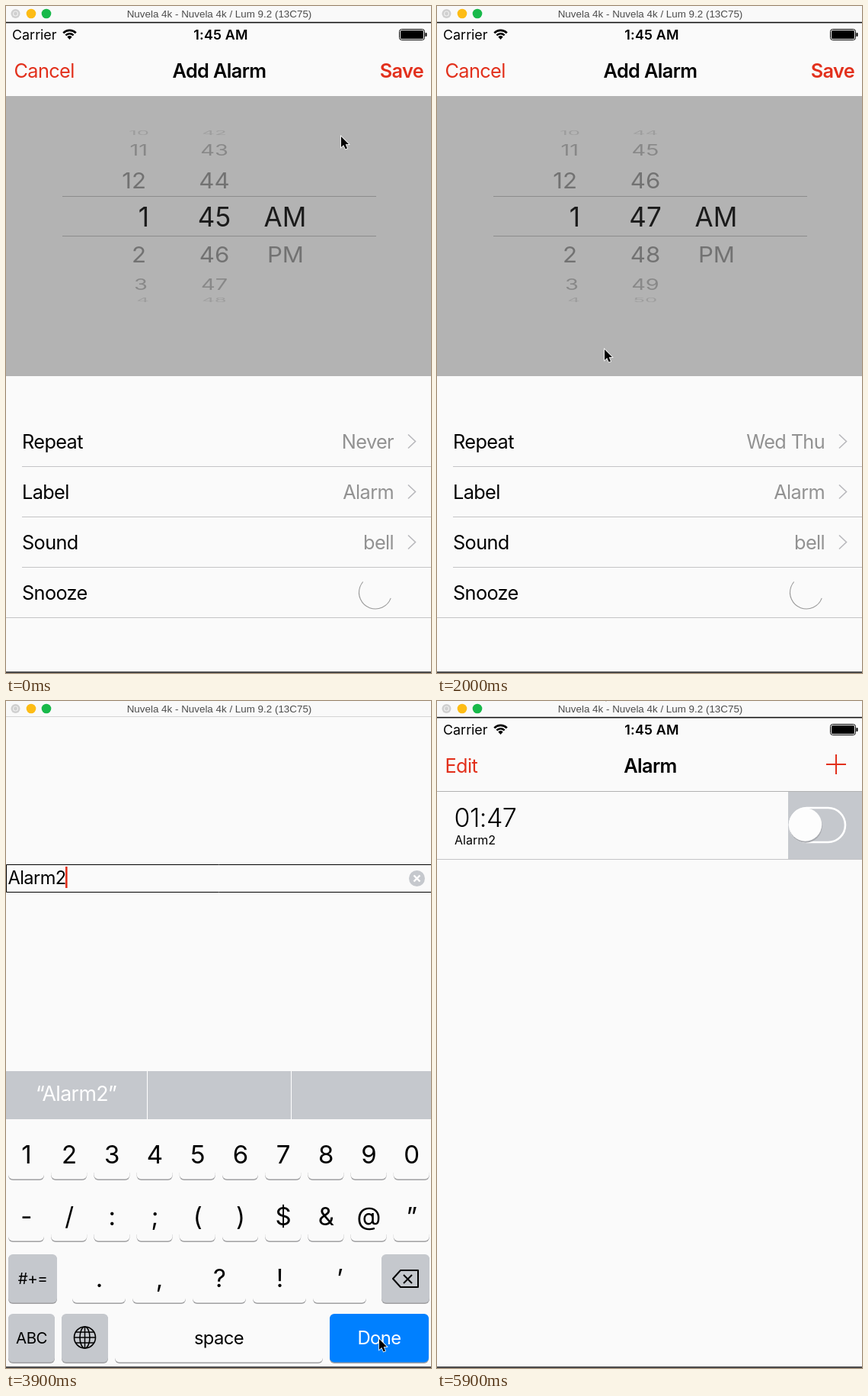
Write an HTML page with a canvas that moves like this. It is 558x874 px and loops after 6000 ms.

```html
<!DOCTYPE html>
<html lang="en">
<head>
<meta charset="utf-8">
<title>Alarm app</title>
<style>
  html, body { margin: 0; width: 100%; height: 100%; overflow: hidden; background: #fafafa; }
  canvas { display: block; }
</style>
</head>
<body>
<canvas id="stage" width="558" height="874"></canvas>
<script>
const ctx = document.getElementById('stage').getContext('2d');
const W = 558, H = 874, LOOP = 6000, STEP = 100;
const BG = '#fafafa', RED = '#e2301c', GREY = '#929292', KEY = '#c5c8cd', LINE = '#c4c4c6', PALE = '#e2e2e2';
const DAYS = ['Sunday', 'Monday', 'Tuesday', 'Wednesday', 'Thursday', 'Friday', 'Saturday'];

// Key times followed by values, joined by straight lines
const SCROLL = [[2600, 0], [2800, 150], [4500, 150], [4800, 0]];
const MINUTE = [[200, 45], [500, 47]];
const REPEAT = [[700, W], [800, 190], [900, 11], [1000, 0], [1700, 0], [1800, 400], [1900, W]];
const LABEL = [[2200, W], [2300, 300], [2400, 88], [2500, 0], [3900, 0], [4000, 400], [4100, W]];
const SHEET = [[5300, 0], [5400, 450], [5500, 1000]];
const POINTER = [
  [0, 440, 171], [200, 275, 320], [500, 275, 225], [700, 431, 572], [800, 431, 560], [900, 431, 402],
  [1000, 431, 345], [1200, 431, 345], [1300, 431, 410], [1400, 431, 410], [1700, 60, 65], [1800, 60, 70],
  [2100, 300, 640], [2200, 300, 636], [2400, 224, 497], [2800, 130, 700], [3000, 39, 825], [3100, 39, 825],
  [3400, 83, 598], [3500, 83, 598], [3800, 490, 836], [3900, 490, 836], [4300, 400, 640], [4500, 379, 594],
  [4800, 379, 594], [5200, 520, 85], [5300, 520, 85], [5900, 216, -16]
];

function track(keys, t, channel = 1) {
  const next = keys.findIndex(k => k[0] > t);
  if (next === 0) return keys[0][channel];
  if (next < 0) return keys[keys.length - 1][channel];
  const a = keys[next - 1], b = keys[next];
  return a[channel] + (b[channel] - a[channel]) * (t - a[0]) / (b[0] - a[0]);
}

function rect(x, y, w, h, color) {
  ctx.fillStyle = color;
  ctx.fillRect(x, y, w, h);
}

function round(x, y, w, h, r, color) {
  ctx.fillStyle = color;
  ctx.beginPath();
  ctx.roundRect(x, y, w, h, r);
  ctx.fill();
}

function outline(x, y, w, h, r, color, width) {
  ctx.strokeStyle = color;
  ctx.lineWidth = width;
  ctx.beginPath();
  ctx.roundRect(x, y, w, h, r);
  ctx.stroke();
}

function disc(x, y, r, color) {
  ctx.fillStyle = color;
  ctx.beginPath();
  ctx.arc(x, y, r, 0, 7);
  ctx.fill();
}

function stroke(color, width, ...points) {
  ctx.strokeStyle = color;
  ctx.lineWidth = width;
  ctx.beginPath();
  points.forEach(p => ctx.lineTo(...p));
  ctx.stroke();
}

function arc(x, y, r, from, to, color, width) {
  ctx.strokeStyle = color;
  ctx.lineWidth = width;
  ctx.beginPath();
  ctx.arc(x, y, r, from, to);
  ctx.stroke();
}

function text(str, x, y, { size = 25.3, color = '#000', align = 'left', weight = 400, gap = -.025 } = {}) {
  ctx.font = `${weight} ${size}px Inter, sans-serif`;
  ctx.letterSpacing = size * gap + 'px';
  ctx.textAlign = align;
  ctx.fillStyle = color;
  ctx.fillText(str, x, y);
}

function group(draw, dx = 0, dy = 0, alpha = 1) {
  ctx.save();
  ctx.translate(dx, dy);
  ctx.globalAlpha *= alpha;
  draw();
  ctx.restore();
}

const title = (str, x = 280) => text(str, x, 94, { weight: 600, align: 'center' });

function navBar() {
  rect(0, 22, W, 97, BG);
  rect(0, 118, W, 1, '#b2b2b2');
}

function statusBar() {
  rect(0, 21, W, 1.4, '#111');
  text('Carrier', 8, 44, { size: 17.9, gap: 0 });
  for (const r of [7.2, 11.6]) arc(83.5, 43.5, r, -2.36, -.78, '#000', 2.6);
  ctx.fillStyle = '#000';
  ctx.beginPath();
  ctx.moveTo(83.5, 44);
  ctx.arc(83.5, 43.5, 4.4, -2.36, -.78);
  ctx.fill();
  text('1:45 AM', 282, 44, { size: 17.9, weight: 600, align: 'center', gap: .01 });
  outline(516.5, 30.5, 33, 14, 3, '#000', 1);
  round(518, 32, 30, 11, 1.5, '#000');
  round(550.5, 35, 2, 5, 1, '#000');
}

function pickerItem(str, row, x, align) {
  const angle = row * .45;
  if (Math.abs(angle) > 1.5) return;
  const cos = Math.cos(angle), near = Math.abs(row) < .5;
  const alpha = near ? .85 : Math.max(.08, .36 - (Math.abs(row) - 1) * .12);
  ctx.save();
  ctx.translate(x, 276 + 112 * Math.sin(angle));
  ctx.scale(near ? 1 : .75 + .25 * cos, cos);
  text(str, 0, 12.6, { size: near ? 35 : 32, color: `rgba(0,0,0,${alpha})`, align, gap: 0 });
  ctx.restore();
}

function picker(minute) {
  rect(0, 119, W, 366, '#b3b3b3');
  for (let row = -3; row <= 3; row++) {
    const right = [188, 184, 186, 188][Math.abs(row)];
    pickerItem(String((row + 12) % 12 + 1), row, right, 'right');
    const value = Math.round(minute) + row;
    pickerItem(String(value), value - minute, 273.5, 'center');
  }
  pickerItem('AM', 0, 366.5, 'center');
  pickerItem('PM', 1, 367, 'center');
  for (const y of [249, 301]) rect(74, y, 412, 1, '#8c8c8c');
}

function addPage(t) {
  rect(0, 119, W, 900, BG);
  picker(track(MINUTE, t));
  const rows = [
    ['Repeat', t < 1700 ? 'Never' : 'Wed Thu'],
    ['Label', t < 3900 ? 'Alarm' : 'Alarm2'],
    ['Sound', 'bell'],
    ['Snooze']
  ];
  rows.forEach(([name, value], i) => {
    const y = 570.5 + i * 66, inset = i < 3 ? 21 : 0;
    text(name, 21, y + 9.5);
    rect(inset, y + 32.5, W - inset, 1, LINE);
    if (!value) return;
    text(value, 509, y + 9.5, { color: GREY, align: 'right' });
    stroke('#b8b8bc', 1.6, [528, y - 9], [537.5, y], [528, y + 9]);
  });
  arc(485, 768.5, 21.5, .35, 3.85, '#999', 1.1);
  rect(0, 1007, W, 20, '#b3b3b3');
}

function addNav() {
  text('Cancel', 10.5, 94, { color: RED });
  title('Add Alarm');
  text('Save', 548, 94, { color: RED, weight: 600, align: 'right' });
}

function repeatPage(t) {
  rect(0, 119, W, 900, BG);
  for (let i = 0; i < 13; i++) {
    const y = 119 + i * 66;
    if (DAYS[i]) text('Every ' + DAYS[i], 23, y + 39.5, { size: 23.6 });
    rect(23, y + 64, W, 1, LINE);
    if (i === 3 && t >= 1100 || i === 4 && t >= 1400)
      stroke(RED, 3, [517, y + 31], [523, y + 37], [534.5, y + 24]);
  }
}

function key(str, x, y, w, { fill, color = '#000', size = 33, weight = 400, lift = 0 } = {}) {
  const h = 64, top = y - h;
  round(x, top + 1, w, h, 6, '#a0a0a2');
  round(x, top, w, h - .5, 6, fill || BG);
  if (!fill) rect(x - 1, top - 1, w + 2, h - 8, BG);
  text(str, x + w / 2, y - 32 - lift + size * .33, { size, color, weight, align: 'center' });
}

function keyboard(numeric, words) {
  rect(0, 698, W, 330, BG);
  rect(0, 635, W, 63, KEY);
  for (const x of [185, 374]) rect(x, 635, 1, 63, '#fff');
  words.forEach((word, i) => text(word, [92, 280, 467.5][i], 674, { size: 26.8, color: '#fff', align: 'center' }));

  const keyRow = (chars, x, y, style, pitch = 56.2, w = 47) =>
    [...chars].forEach((c, i) => key(c, x + i * pitch, y, w, style));
  const grey = { fill: KEY, size: 20.5 };
  if (numeric) {
    keyRow('1234567890', 3, 777);
    keyRow('-/:;()$&@”', 3, 858);
    keyRow('.,?!’', 87, 939, {}, 79, 70);
  } else {
    const light = { size: 37, weight: 300, lift: 2 };
    keyRow('qwertyuiop', 4.5, 777, light);
    keyRow('asdfghjkl', 32.5, 858, light);
    keyRow('zxcvbnm', 88, 939, light);
  }
  key(numeric ? '#+=' : '⇧', 3, 939, 64, grey);
  key('', 493, 939, 63, grey);
  ctx.lineJoin = 'round';
  stroke('#000', 2, [508, 907], [518, 896], [541, 896], [541, 918], [518, 918], [508, 907], [518, 896]);
  stroke('#000', 2, [522, 902], [533, 913]);
  stroke('#000', 2, [533, 902], [522, 913]);
  ctx.lineJoin = 'miter';
  key(numeric ? 'ABC' : '123', 3, 1017, 61, grey);
  key('', 73, 1017, 61, grey);
  globe(103.5, 984);
  key('space', 143, 1017, 273, { size: 23.8 });
  key('Done', 425, 1017, 130, { fill: '#0080ff', color: '#fff', size: 23.8 });
}

function globe(x, y) {
  arc(x, y, 14, 0, 7, '#000', 1.6);
  ctx.beginPath();
  ctx.ellipse(x, y, 6.5, 14, 0, 0, 7);
  ctx.stroke();
  stroke('#000', 1.5, [x, y - 14], [x, y + 14]);
  for (const [dy, half] of [[-7, 12], [0, 14], [7, 12]])
    stroke('#000', 1.5, [x - half, y + dy], [x + half, y + dy]);
}

function labelPage(t) {
  rect(0, 119, W, 900, BG);
  const value = t < 3500 ? 'Alarm' : 'Alarm2';
  outline(.5, 364.5, W, 36, 0, '#000', 1);
  text(value, 2.5, 389.5, { size: 23.6 });
  rect(2 + ctx.measureText(value).width, 367, 2.6, 28, RED);
  if (t >= 2500) {
    disc(539.5, 382.5, 10.5, KEY);
    stroke('#fff', 2.4, [535.5, 378.5], [543.5, 386.5]);
    stroke('#fff', 2.4, [543.5, 378.5], [535.5, 386.5]);
  }
  const words = t < 2500 ? [] : t < 3500 ? ['“Alarm”', 'Alarms', 'Alarmed'] : ['“Alarm2”'];
  keyboard(t >= 3100, words);
}

// Slides a detail page over the form, the form trailing behind at 30%
function pushed(name, page, offset, t) {
  const shown = 1 - offset / W;
  group(() => {
    addPage(t);
    rect(0, 119, W, 366, `rgba(0,0,0,${.08 * shown})`);
  }, -.3 * W * shown);
  group(() => page(t), offset);
  navBar();
  group(addNav, 0, 0, Math.max(0, (offset - 100) / 458));
  const drift = offset * offset;
  group(() => {
    const color = offset > 40 || t === 1700 ? PALE : RED;
    stroke(color, 3.4, [29, 71], [14, 85], [29, 99]);
    text('Back', 40 + Math.min(200, drift * .0044), 94, { color });
    title(name, 280 + Math.min(280, drift * .0075));
  }, 0, 0, Math.max(0, 1 - offset / 440));
}

function listPage() {
  rect(0, 22, W, 1000, BG);
  navBar();
  text('Edit', 10.5, 94, { color: RED });
  title('Alarm');
  rect(511, 82, 26, 2, RED);
  rect(523, 70, 2, 26, RED);
  text('01:47', 22.5, 165, { size: 34, weight: 300, gap: -.015 });
  text('Alarm2', 23, 188, { size: 16, gap: 0 });
  rect(461, 119, 97, 88, KEY);
  rect(0, 207, W, 1, LINE);
  outline(463, 140, 73, 45, 22.5, '#fff', 2.6);
  disc(484, 164, 21.7, '#a9abb0');
  disc(483.5, 162, 21.7, '#fdfdfd');
}

function windowFrame() {
  rect(0, 0, W, 21, '#f9f9f9');
  rect(0, 20, W, 1, '#d4d4d4');
  disc(12.5, 10, 6, '#cfcfcf');
  arc(12.5, 10, 3, 0, 7, '#eee', 1.2);
  disc(33, 10, 6.3, '#fdbc15');
  disc(53, 10, 6.3, '#18b94a');
  ctx.font = '13.4px "Liberation Sans", Arial, sans-serif';
  ctx.letterSpacing = '0px';
  ctx.textAlign = 'center';
  ctx.fillStyle = '#4c4c4c';
  ctx.fillText('Nuvela 4k - Nuvela 4k / Lum 9.2 (13C75)', 280, 15);
  rect(0, 872, W, 2, '#4a4a4c');
}

function pointer(x, y) {
  ctx.beginPath();
  for (const [px, py] of [[0, 0], [0, 14], [3.2, 11], [5.7, 16.5], [8, 15.5], [5.7, 10.2], [10, 10]])
    ctx.lineTo(x + px, y + py);
  ctx.closePath();
  ctx.strokeStyle = '#fff';
  ctx.lineWidth = 1.6;
  ctx.stroke();
  ctx.fillStyle = '#000';
  ctx.fill();
}

function screen(t) {
  const repeat = track(REPEAT, t), label = track(LABEL, t), sheet = track(SHEET, t);
  if (repeat < W) pushed('Repeat', repeatPage, repeat, t);
  else if (label < W) pushed('Label', labelPage, label, t);
  else {
    if (sheet) listPage();
    group(() => {
      addPage(t);
      navBar();
      addNav();
    }, 0, sheet);
  }
  statusBar();
}

function draw(t) {
  const scroll = track(SCROLL, t);
  rect(0, 0, W, H, BG);
  group(() => screen(t), 0, -scroll);
  if (t > 2600 && t < 3400 || t > 4500 && t < 5000)
    round(553.5, 22 + scroll * .86, 6, 724, 3, 'rgba(110,110,110,.45)');
  windowFrame();
  pointer(track(POINTER, t), track(POINTER, t, 2));
}

function frame() {
  draw(Math.floor(performance.now() % LOOP / STEP) * STEP);
  requestAnimationFrame(frame);
}
frame();
</script>
</body>
</html>
```
